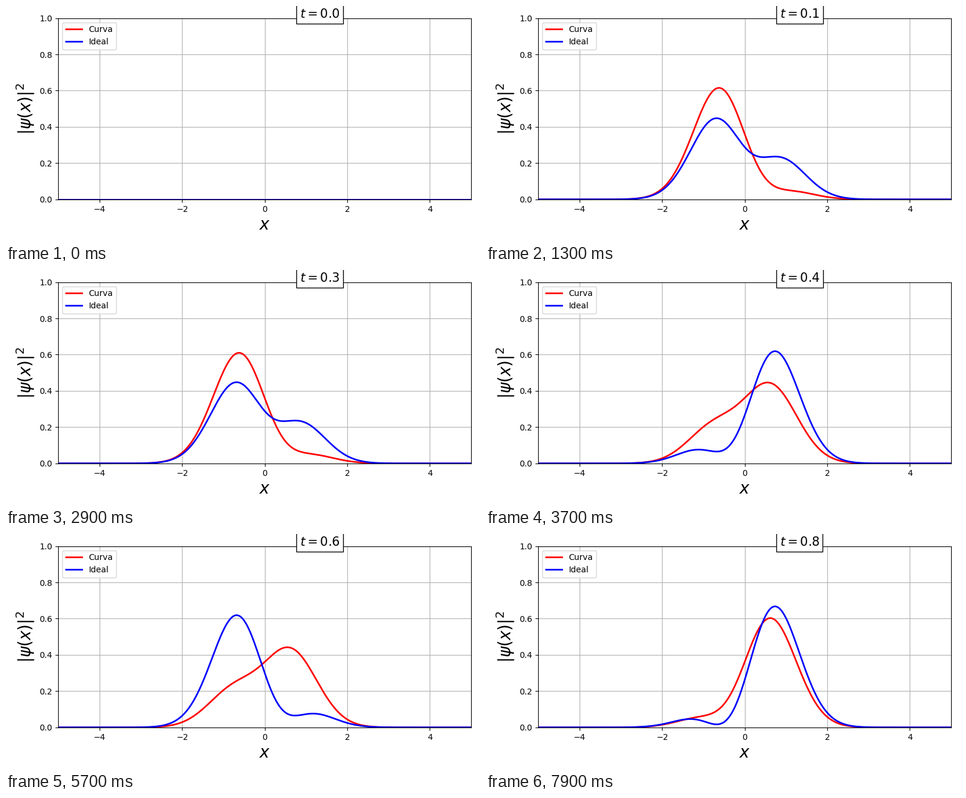
A matplotlib script that plays this animation: 800x400 px, repeating every 8000 ms.

```python
import numpy as np
import matplotlib.pyplot as plt
from matplotlib.animation import FuncAnimation

W, H, DPI = 800, 400, 100
FRAMES, INTERVAL = 80, 100
DT = 0.01

x = np.linspace(-5, 5, 501)


def density(x, ground, phase):
    """|psi|^2 of a two-level oscillator state with ground-state weight `ground`."""
    excited = 1 - ground
    cross = 2 * np.sqrt(2 * ground * excited) * x * np.cos(phase)
    return np.exp(-x**2) / np.sqrt(np.pi) * (ground + 2 * excited * x**2 + cross)


fig = plt.figure(figsize=(W / DPI, H / DPI), dpi=DPI, facecolor="white")
ax = fig.add_axes([88.2 / W, 72.2 / H, 696.8 / W, 307.2 / H])
ax.set_xlim(-5, 5)
ax.set_ylim(0, 1)
ax.set_xlabel(r"$x$", fontsize=20)
ax.set_ylabel(r"$|\psi(x)|^2$", fontsize=20)
ax.grid(True)

# line, well centre, ground-state weight, phase advance per step
curves = [
    (ax.plot([], [], color="red", lw=2, label="Curva")[0], 0, 0.64, np.radians(17.96)),
    (ax.plot([], [], color="blue", lw=2, label="Ideal")[0], 0.027, 0.5, np.radians(9)),
]
ax.legend(loc="upper left")

clock = fig.text(495.8 / W, 380 / H, "", fontsize=15,
                 bbox=dict(facecolor="white", edgecolor="black"))


def update(n):
    clock.set_text(rf"$t = {n * DT:.1f}$")
    for line, centre, ground, step in curves:
        # both curves start flat, then jump to the initial state
        y = density(x - centre, ground, step * (n - 1)) if n else np.zeros_like(x)
        line.set_data(x, y)
    return [clock] + [c[0] for c in curves]


anim = FuncAnimation(fig, update, frames=FRAMES, interval=INTERVAL,
                     init_func=lambda: update(0), repeat=True, repeat_delay=0)
plt.show()
```
